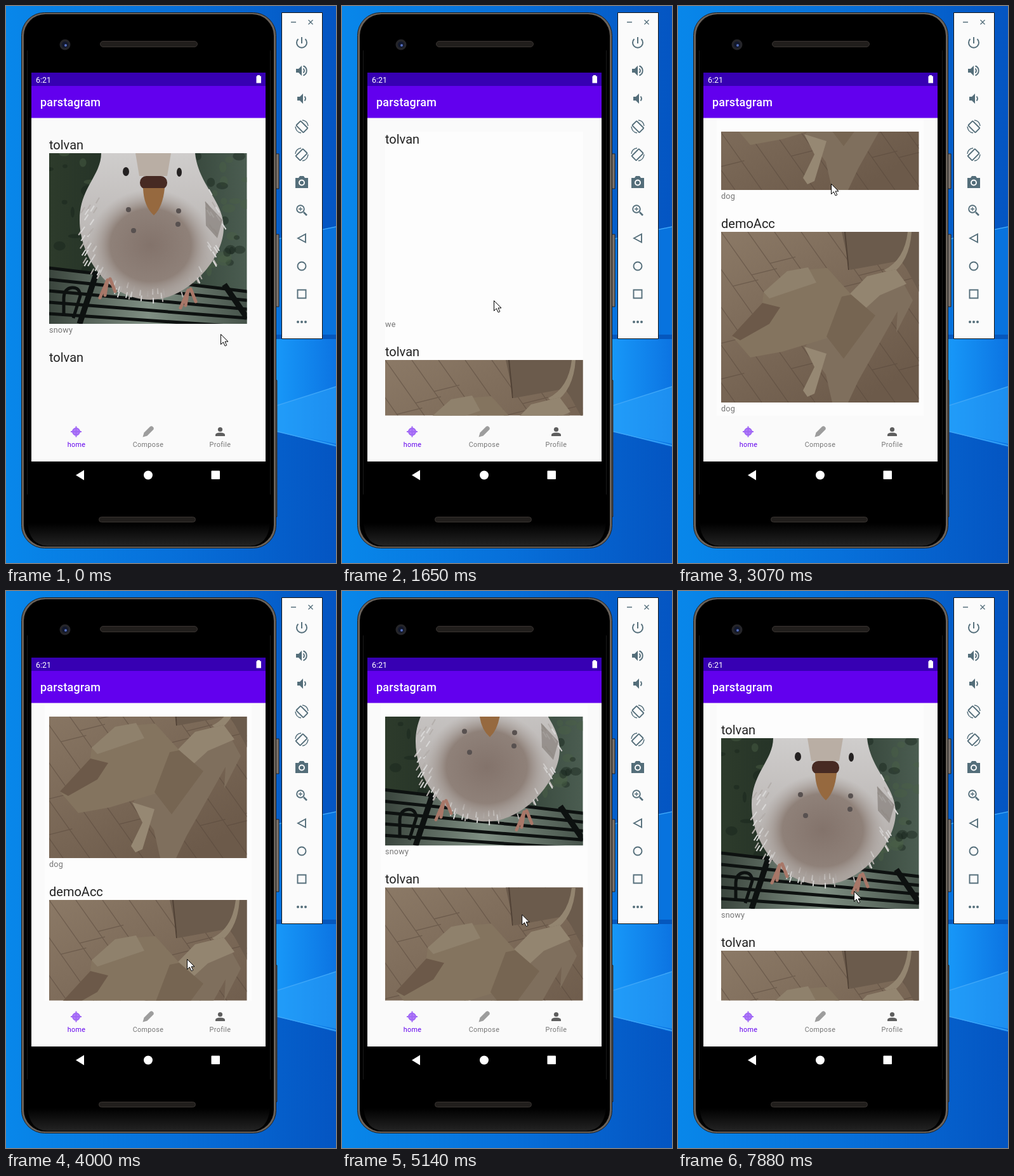
Write an HTML page that moves like this. It is 520 px wide and 878 px high and loops after 8000 ms.

```html
<!DOCTYPE html>
<html lang="en">
<head>
<meta charset="utf-8">
<title>Photo feed</title>
<style>
  html, body { margin: 0; width: 100%; height: 100%; overflow: hidden; background: #0865d0; }
  svg { display: block; width: 520px; height: 878px; font-family: Roboto, sans-serif; }
  .title { font-size: 18px; font-weight: 500; letter-spacing: .22px; fill: #fff; }
  .name { font-size: 20px; fill: #222; }
  .caption { font-size: 12.6px; letter-spacing: .2px; fill: #757575; }
  .tab { font-size: 10.8px; letter-spacing: .36px; fill: #757575; text-anchor: middle; }
  .line { fill: none; stroke: #546e7a; stroke-width: 1.9; }
  .solid { fill: #546e7a; stroke: none; }
</style>
</head>
<body>
<svg viewBox="0 0 520 878">
  <defs>
    <linearGradient id="sky"><stop stop-color="#0887ea"/><stop offset=".5" stop-color="#0770da"/><stop offset="1" stop-color="#0455c2"/></linearGradient>
    <linearGradient id="beam"><stop stop-color="#189afa"/><stop offset="1" stop-color="#0c74e2"/></linearGradient>
    <linearGradient id="chin" x2="0" y2="1"><stop/><stop offset="1" stop-color="#232323"/></linearGradient>
    <linearGradient id="leaves"><stop stop-color="#2d3b2b"/><stop offset=".4" stop-color="#223026"/><stop offset="1" stop-color="#4b5d51"/></linearGradient>
    <linearGradient id="ground"><stop stop-color="#3a453d"/><stop offset=".5" stop-color="#809084"/><stop offset="1" stop-color="#46534a"/></linearGradient>
    <linearGradient id="plumage" x2="0" y2="1"><stop stop-color="#cfcdcc"/><stop offset=".5" stop-color="#bebab8"/><stop offset="1" stop-color="#aaa39e"/></linearGradient>
    <radialGradient id="belly"><stop stop-color="#83736b"/><stop offset=".65" stop-color="#8f8179"/><stop offset="1" stop-color="#aaa29d" stop-opacity="0"/></radialGradient>
    <linearGradient id="floor" x2=".7" y2="1"><stop stop-color="#8b7966"/><stop offset="1" stop-color="#6c5a4a"/></linearGradient>
    <clipPath id="frame"><path d="M0 0h311.5v269H0z"/></clipPath>
    <clipPath id="feed"><path d="M40 198h369v447.5H40z"/></clipPath>

    <g id="dog" clip-path="url(#frame)">
      <path d="M0 0h312v269H0z" fill="url(#floor)"/>
      <path id="planks" fill="none" stroke="#57473a" stroke-width="1.3" opacity=".5"/>
      <path d="M190 0H312V95L285 45 203 60z" fill="#6b5b4c"/>
      <path d="M195 0l6 60" stroke="#514236" stroke-width="2"/>
      <path d="M257 60Q289 44 294 0h6Q297 48 266 68z" fill="#938570"/>
      <path d="M195 105L230 70 275 59 302 108 276 159 278 125 216 235 200 269H175L165 225 133 180z" fill="#7f6f5d"/>
      <path d="M196 105L230 70 275 59 292 82 250 100 226 122z" fill="#938570"/>
      <path d="M131 181L147 213 129 250 136 260 147 255 166 192z" fill="#968873"/>
      <path d="M17 164L65 112 67 95 104 62 167 57 205 99 172 166 96 189 46 198z" fill="#84745f"/>
      <path d="M67 95L104 62 137 56 150 80 76 105z" fill="#8f816c"/>
      <path d="M65 112L93 119 76 145 30 171 17 164z" fill="#6c5949"/>
      <path d="M190 102L205 99 243 132 193 200 166 165z" fill="#766552"/>
    </g>

    <g id="bird" clip-path="url(#frame)">
      <path d="M0 0h312v269H0z" fill="url(#leaves)"/>
      <g id="foliage"/>
      <path d="M0 181L312 218V269H0z" fill="url(#ground)"/>
      <path id="bars" stroke="#0d1110" stroke-width="5"/>
      <g fill="none" stroke="#0d1110" stroke-width="9">
        <path d="M75 187L48 269M276 207L312 260"/>
        <path d="M23 257V228Q24 213 36 212T49 225L38 260" stroke-width="5"/>
      </g>
      <path d="M82 0C82 35 48 55 48 105C48 165 95 231 160 231C220 231 275 165 275 118C275 75 235 50 230 0z" fill="url(#plumage)"/>
      <g id="feathers" stroke-width="2"/>
      <ellipse cx="160" cy="145" rx="98" ry="88" fill="url(#belly)"/>
      <path d="M246 76l27 29-8 29-18-20z" fill="#77706a" opacity=".55"/>
      <path d="M136 0h56l-6 36h-44z" fill="#b9aea4"/>
      <rect x="143" y="36" width="43" height="21" rx="10" fill="#472a23"/>
      <path d="M148 55h34q-3 30-17 43-16-14-17-43z" fill="#96693f"/>
      <g fill="#242121"><ellipse cx="121" cy="29" rx="5" ry="7"/><ellipse cx="205" cy="30" rx="4" ry="7"/></g>
      <path d="M125 89h0M133 122h0M204 91h0M203 112h0" stroke="#585150" stroke-width="8" stroke-linecap="round"/>
      <path id="foot" d="M92 200l-12 28M92 200l-4 24M96 198l8 20" stroke="#a87768" stroke-width="5" stroke-linecap="round"/>
      <use href="#foot" x="127" y="16"/>
    </g>
  </defs>

  <path d="M0 0h520v878H0z" fill="url(#sky)"/>
  <path d="M420 369L520 348V518H420z" fill="#0873de"/>
  <path d="M420 525h100v170L420 669z" fill="url(#beam)"/>
  <path d="M420 632L520 600V690L420 669z" fill="#28a0fb" opacity=".6"/>
  <path d="M420 369L520 348M420 632L520 600M420 669L520 693" stroke="#3da6f8" stroke-width="1.5"/>
  <path d="M420 518h100v7H420z" fill="#0557bd"/>

  <path d="M425 233h5v55h-5zM425 360h5v114h-5zM423 590h4v215h-4z" fill="#77706a" stroke="#282522"/>
  <rect x="24.5" y="10.500" width="401" height="844" rx="36" fill="#69625b" stroke="#211f1d"/>
  <rect x="28" y="13" width="394" height="839" rx="34"/>
  <path d="M34 815h382q-3 35-31 36H65q-28-1-31-36z" fill="url(#chin)"/>
  <path d="M33.500 70V770M416.500 70V770" stroke="#1b1b1b"/>
  <g fill="#211e1c" stroke="#393431"><rect x="148.500" y="55.500" width="153" height="9" rx="4.500"/><rect x="146.500" y="805.500" width="152" height="8" rx="4"/></g>
  <circle cx="93" cy="61" r="8.500" fill="#252529"/><circle cx="93" cy="61" r="5" fill="#12182c"/><circle cx="94" cy="62" r="2" fill="#566fc0"/>

  <path d="M40 105h369v613H40z" fill="#fafafa"/>
  <path d="M40 105h369v21H40z" fill="#3700b3"/>
  <path d="M40 126h369v50.500H40z" fill="#6200ee"/>
  <text x="47" y="120.500" font-size="12.500" fill="#fff">6:21</text>
  <path d="M396 109h4v1.500h2v11h-7.500v-11H396z" fill="#fff"/>
  <text class="title" x="54" y="158">parstagram</text>

  <g fill="#fdfdfd">
    <path data-from="1200" d="M68 198h312v448H68z"/>
    <path data-from="2500" d="M61 178h326v468H61z"/>
  </g>
  <g clip-path="url(#feed)">
    <g id="list"></g>
    <g id="spinner">
      <circle r="18.500" cy="1" opacity=".08"/><circle r="18" fill="#fff"/>
      <circle id="arc" r="8" fill="none" stroke="#1fcdf5" stroke-width="2.500" stroke-dasharray="39 12"/>
    </g>
  </g>

  <g fill="none" stroke="#a068f5" stroke-width="2"><circle cx="110.500" cy="671" r="5.500" fill="#b27cf8"/><path d="M110.500 662.500v17M102 671h17"/></g>
  <path d="M215.500 679.500l2-7 9-9q2-2 4-1l2 2q1 2-1 4l-9 9z" fill="#9d9d9d"/>
  <g fill="#5e5e5e"><circle cx="337.500" cy="667.500" r="3.600"/><path d="M330 678v-2q0-3.500 7.500-3.500t7.500 3.500v2z"/></g>
  <text class="tab" x="111" y="694.500" style="fill:#6200ee">home</text>
  <text class="tab" x="224" y="694.500">Compose</text>
  <text class="tab" x="337.500" y="694.500">Profile</text>
  <g fill="#fff"><path d="M110 739.500l13-8v16z"/><circle cx="224" cy="739.500" r="7"/><rect x="323.500" y="732.500" width="13.500" height="13.500" rx="1"/></g>

  <path d="M434.500 10.500h64v514h-64z" fill="#fbfbfb" stroke="#111"/>
  <g class="line">
    <path d="M449 25.500h8M476.500 22l7 7m0-7l-7 7" stroke-width="1.300"/>
    <path d="M466 49v10M460.500 52a8 8 0 1 0 11 0"/>
    <path class="solid" d="M457 99h4l5-5v16l-5-5h-4zM459 143h4l5-5v16l-5-5h-4z"/>
    <path d="M468.500 98.500q3 3.500 0 7M468.500 94.500a8 8 0 0 1 0 15M470.500 142.500q3 3.500 0 7"/>
    <g id="turn" transform="translate(466 190)"><rect x="-5" y="-7.500" width="10" height="16" rx="1" transform="rotate(-45)"/><path d="M1-10Q9-9 10-1M-10 0Q-9 9-1 10" stroke-width="1.500"/></g>
    <use href="#turn" transform="translate(932 44) scale(-1 1)"/>
    <path class="solid" d="M456 271h5l2-3h6l2 3h5v16h-20z"/><circle cx="466" cy="278.500" r="4" stroke="#fff"/>
    <path d="M469 325l5 5" stroke-width="2.600"/><circle cx="464" cy="320" r="5.800"/><path d="M461 320h6m-3-3v6" stroke-width="1.300"/>
    <path d="M460 366l12-6.500v13z"/><circle cx="466" cy="410" r="6.500"/><path d="M459.500 447.500h13v13h-13z"/>
    <path d="M460 498h0m6 0h0m6 0h0" stroke-width="4" stroke-linecap="round"/>
  </g>

  <path id="cursor" d="M.5.5v16l3.800-3.600 2.900 6 2.600-1.200-2.800-5.700h5z" fill="#fff" stroke="#000"/>
</svg>
<script>
  const LOOP = 8000, PITCH = 335, TICK = 126.9, PHASE = 378, FLING_TIME = 500;
  const $ = id => document.getElementById(id);
  const repeat = (count, make) => Array.from({ length: count }, (_, i) => make(i)).join("");

  const posts = [
    ["tolvan", "snowy", "bird"], ["tolvan", "we", "dog"], ["tolvan", "test2", "dog"],
    ["tolvan", "dogy", "dog"], ["tolvan", "dog", "dog"], ["demoAcc", "dog", "dog"]
  ];
  // The post without a photo shows a recycled one after scrolling back.
  $("list").innerHTML = posts.map(([name, caption, photo], i) => `
    <g transform="translate(68 ${i * PITCH})">
      <text class="name" y="226">${name}</text>
      <use href="#${photo}" y="232" ${caption === "we" ? 'data-from="2500"' : ""}/>
      <text class="caption" y="514.5">${caption}</text>
    </g>`).join("");

  let seed = 7;
  const random = (min, max) => {
    seed = seed * 16807 % 2147483647;
    return min + (max - min) * seed / 2147483647;
  };

  $("planks").setAttribute("d", repeat(12, i => {
    const x = (i - 5) * 42, y = random(20, 110);
    return `M${x} 0l190 269` + repeat(2, k => `M${x + (y + k * 130) * .706} ${y + k * 130}l40 -10`);
  }));
  $("bars").setAttribute("d", repeat(5, i => `M0 ${181 + i * 18}L312 ${218 + i * 14}`));
  $("foliage").innerHTML = repeat(80, i => `<ellipse cx="${random(0, 312)}" cy="${random(0, 190)}"
    rx="${random(3, 12)}" ry="${random(3, 9)}" fill="${i % 2 ? "#4b6045" : "#17241b"}" opacity=".45"/>`);
  $("feathers").innerHTML = repeat(90, i => {
    const angle = random(-.6, 3.7), reach = random(.8, 1);
    const x = 161 + Math.cos(angle) * 113 * reach, y = 118 + Math.sin(angle) * 113 * reach;
    return `<path d="M${x} ${y}l${Math.cos(angle) * 6} 9" stroke="${i % 2 ? "#d9d8d7" : "#b4afac"}"/>`;
  });

  const clamp = p => Math.min(1, Math.max(0, p));
  const easeOut = p => 1 - (1 - clamp(p)) ** 3;
  const easeInOut = p => p * p * (3 - 2 * p);

  // Each fling: start time and distance.
  const flings = [[1147, 344], [1850, 317], [2500, 890], [3881, -482], [4800, -1069]];
  const scrollAt = t => flings.reduce((y, [start, distance]) =>
    y + distance * easeOut((t - start) / FLING_TIME), 0);

  // Turning points of the pointer: time, x, y.
  const turns = [
    [300, 338, 517], [750, 258, 315], [1130, 264, 524], [1400, 243, 340],
    [1647, 239, 464], [2030, 246, 325], [2408, 251, 479], [2750, 241, 280],
    [3250, 241, 280], [3931, 285, 580], [4566, 272, 305], [5020, 284, 540],
    [5260, 278, 300], [5800, 291, 535], [6215, 288, 378], [7240, 288, 378],
    [7500, 296, 346], [7730, 275, 513], [7865, 277, 473]
  ];
  function cursorAt(t) {
    const next = turns.findIndex(turn => turn[0] > t);
    if (next < 1) return turns.at(next).slice(1);
    const [t0, x0, y0] = turns[next - 1], [t1, x1, y1] = turns[next];
    const p = easeInOut((t - t0) / (t1 - t0));
    return [x0 + (x1 - x0) * p, y0 + (y1 - y0) * p];
  }

  const show = (node, on) => node.style.display = on ? "" : "none";
  const place = (id, transform) => $(id).setAttribute("transform", transform);
  const delayed = document.querySelectorAll("[data-from]");
  const start = performance.now();

  function draw() {
    const now = (performance.now() - start) % LOOP;
    const t = Math.max(0, PHASE + Math.floor((now - PHASE) / TICK) * TICK);
    place("list", `translate(0 ${-scrollAt(t)})`);
    place("cursor", `translate(${cursorAt(t)})`);
    delayed.forEach(node => show(node, t >= +node.dataset.from));
    show($("spinner"), t > 5500 && t < 6650);
    place("spinner", `translate(224 ${178 + 52 * easeOut((t - 5380) / 600)}) scale(${clamp((6650 - t) / 200)})`);
    place("arc", `rotate(${(t - 6215) * .6 - 100})`);
    requestAnimationFrame(draw);
  }
  draw();
</script>
</body>
</html>
```
